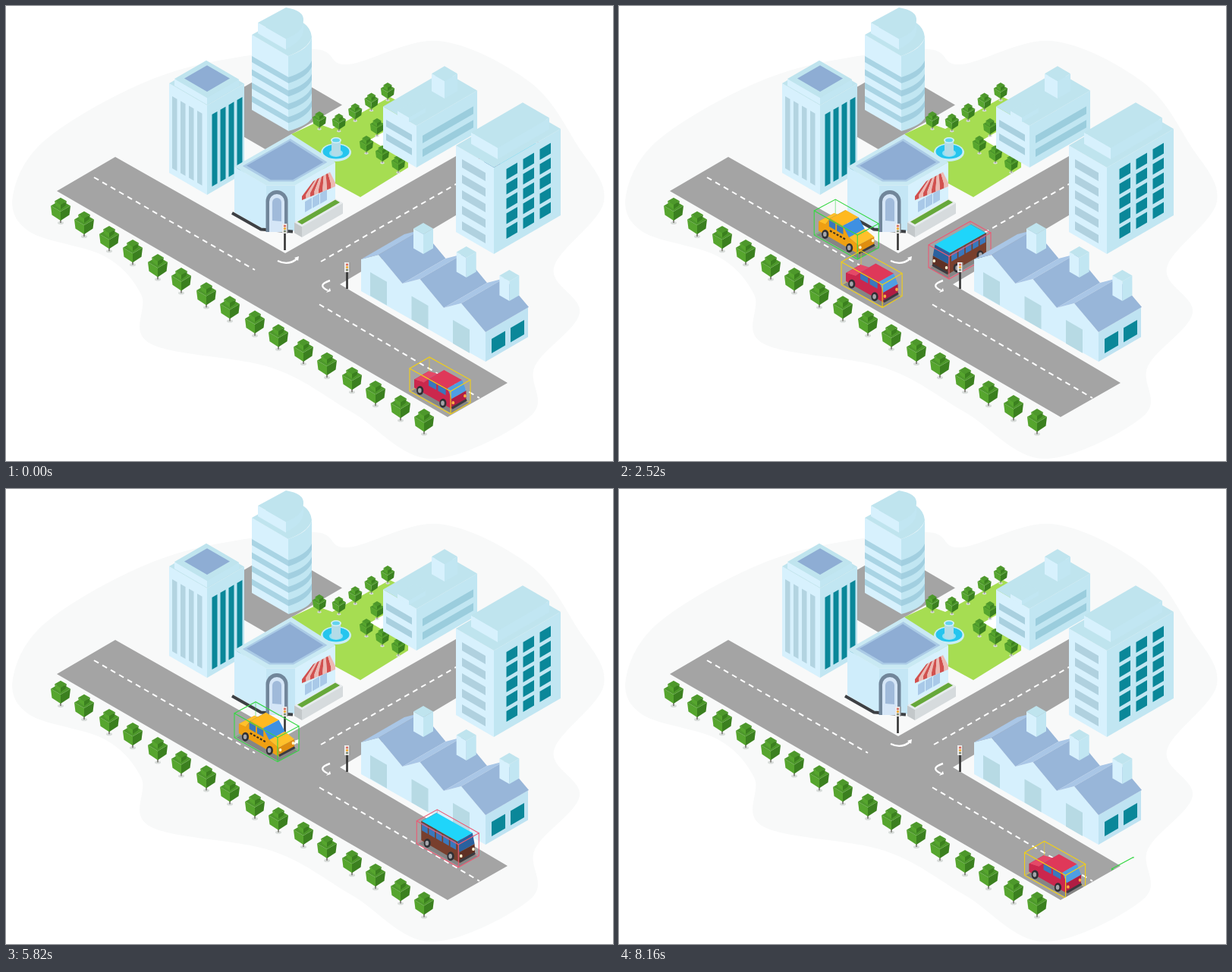
Recreate the animation shown at these times as an HTML page with a canvas. Size 800x600 px, loop 8.22 s.

```html
<!DOCTYPE html>
<html>
<head>
<meta charset="utf-8">
<title>Isometric traffic</title>
<style>
html, body { margin: 0; width: 100%; height: 100%; overflow: hidden; background: #fff; }
canvas { display: block; }
</style>
</head>
<body>
<canvas id="stage" width="800" height="600"></canvas>
<script>
const ctx = document.getElementById('stage').getContext('2d');
const LOOP = 8220, STEP = 60, SLOPE = .58;
const PALE = '#d7f1fd', SIDE = '#c1e6f2', ROOF = '#bfe4ee', BAND = '#a9d0df',
      TEAL = '#0a8799', BLUE = '#8eadd4', GRAY = '#a4a4a4';

function trace(points) {
  ctx.beginPath();
  points.forEach(p => ctx.lineTo(...p));
}
function poly(color, ...points) {
  trace(points);
  ctx.fillStyle = color;
  ctx.fill();
}
function line(color, width, ...points) {
  trace(points);
  ctx.strokeStyle = color;
  ctx.lineWidth = width;
  ctx.stroke();
}
function shape(color, d) {
  ctx.fillStyle = color;
  ctx.fill(new Path2D(d));
}
function oval(color, x, y, rx, ry) {
  ctx.beginPath();
  ctx.ellipse(x, y, rx, ry, 0, 0, 7);
  ctx.fillStyle = color;
  ctx.fill();
}
function at(x, y, draw, sx = 1, sy = sx) {
  ctx.save();
  ctx.translate(x, y);
  ctx.scale(sx, sy);
  draw();
  ctx.restore();
}
function repeat(n, draw) {
  for (let i = 0; i < n; i++) draw(i);
}

// Wall piece whose top edge follows the given slope
function panel(color, x, y, w, h, slope = SLOPE) {
  const y2 = y + w * slope;
  poly(color, [x, y], [x + w, y2], [x + w, y2 + h], [x, y + h]);
}
// Flat rhombus from its front corner, a to the left and b to the right
function tile(color, x, y, a, b) {
  const k = SLOPE;
  poly(color, [x, y], [x - a, y - a * k], [x - a + b, y - (a + b) * k], [x + b, y - b * k]);
}
function prism(x, y, a, b, h, top = ROOF, left = PALE, right = SIDE) {
  panel(left, x - a, y - a * SLOPE, a, h);
  panel(right, x, y, b, h, -SLOPE);
  tile(top, x, y, a, b);
}

function blob() {
  const p = [[10,245], [60,170], [216,88], [400,57], [450,77], [570,46], [690,100], [752,182], [788,258],
    [722,345], [756,405], [697,475], [692,540], [560,597], [455,535], [350,477], [190,445], [178,380],
    [130,330], [30,297]];
  const n = p.length, get = i => p[(i + n) % n];
  const handle = (i, s) => [0, 1].map(k => get(i)[k] + s * (get(i + 1)[k] - get(i - 1)[k]) / 6);
  ctx.beginPath();
  ctx.moveTo(...p[0]);
  repeat(n, i => ctx.bezierCurveTo(...handle(i, 1), ...handle(i + 1, -1), ...get(i + 1)));
  ctx.fillStyle = '#f8f9f9';
  ctx.fill();
}

function arrow(d, x, y, tilt) {
  ctx.strokeStyle = '#fff';
  ctx.lineWidth = 2.4;
  ctx.stroke(new Path2D(d));
  poly('#fff', [x, y], [x - 6, y + 2], [x - 1, y + tilt]);
}
function roads() {
  tile(GRAY, 342, 189, 85, 101);
  poly(GRAY, [144,199], [368,326], [593,198], [655,239], [440,367], [661,497], [582,542], [67,244]);
  ctx.setLineDash([7, 5.7]);
  line('#fff', 2, [116,226], [328,348]);
  line('#fff', 2, [413,393.5], [624,517]);
  line('#fff', 2, [415,337], [600,231]);
  ctx.setLineDash([]);
  arrow('M358 336Q372 343 384 333', 386, 330, 6);
  arrow('M427 362Q409 368 424 375', 428, 376, -4);
}

function tree() {
  oval('#d8dcda', 0, 19, 4, 2);
  line('#8c8c86', 2, [0, 11], [0, 19]);
  [[13, 4, 12], [8, -5, 6]].forEach(([r, y, h]) => {
    poly('#56a52e', [-r, y - r * SLOPE], [0, y], [0, y + h], [1.5 - r, y + h - r * SLOPE]);
    poly('#3b801f', [r, y - r * SLOPE], [0, y], [0, y + h], [r - 1.5, y + h - r * SLOPE]);
    tile('#4d982b', 0, y, r, r);
  });
}
function treeRow(x, y, dx, dy, n, size = 1) {
  repeat(n, i => at(x + dx * i, y + dy * i, tree, size));
}

function park() {
  poly('#a6dd52', [376,169], [408,154], [430,162], [506,120], [530,132], [530,213], [467,252], [434,234]);
  tile('#fff', 526, 203, 46, 50);
  oval('#c9edf5', 435, 193, 20, 12);
  oval('#25c5ee', 435, 192, 17.5, 9.5);
  oval('#8fe2f5', 435, 194, 9, 5);
  panel('#b2dce8', 429, 178, 12, 17, 0);
  oval('#b2dce8', 435, 195, 6, 3);
  oval('#d3f0f7', 435, 177, 7, 4);
  oval('#62d3ee', 435, 177, 5, 2.5);
  treeRow(503, 111, -21.4, 13.6, 4, .7);
  treeRow(413, 149, 76, 9, 2, .7);
  treeRow(475, 181, 21, 12.7, 3, .7);
}

function roundTower() {
  shape(SIDE, 'M372 66Q401 56 403 40V148Q397 158 372 165Z');
  panel(PALE, 324, 38, 48, 99);
  repeat(4, i => {
    const y = 66 + 17.5 * i;
    panel('#a9d4e4', 324, y, 48, 8);
    shape('#a2cfe0', `M372 ${y + 28}Q397 ${y + 20} 403 ${y + 6}v8Q397 ${y + 28} 372 ${y + 36}Z`);
  });
  shape(ROOF, 'M324 38L361 17Q400 15 403 41Q399 56 372 66Z');
  shape(SIDE, 'M369 43Q393 34 392 18V31Q392 45 369 57Z');
  panel(PALE, 332, 22, 37, 14);
  shape(ROOF, 'M332 22L369 2Q393 6 392 19Q392 34 369 43Z');
}

function stripedTower() {
  prism(265, 131, 50, 49, 118);
  repeat(4, i => {
    panel('#b3d4e1', 219 + i * 11, 119 + i * 6.3, 6.5, 95);
    panel(TEAL, 271.5 + i * 11, 143 - i * 6.3, 7, 95, -SLOPE);
  });
  prism(265, 121, 43, 42, 9);
  tile(BLUE, 265, 113, 30, 30);
}

function awning() {
  const n = 8, top = k => [405 + 22 * k, 231 - 12 * k], edge = (k, y) => [390 + 44 * k, y - 18 * k];
  repeat(n, i => {
    const a = i / n, b = (i + 1) / n;
    poly(i % 2 ? '#edb9b3' : '#d2504e', top(a), top(b), edge(b, 251), edge(b, 256), edge(a, 256), edge(a, 251));
  });
}
function shop() {
  panel('#cfedfb', 301, 212, 42, 60);
  panel('#c4e6f5', 343, 236.5, 38, 60, 0);
  panel(PALE, 381, 236.5, 53, 60, -SLOPE);
  const rim = [[301,212], [376,169], [434,206], [381,236.5], [343,236.5]];
  const inset = s => rim.map(([x, y]) => [368 + (x - 368) * s, 206 + (y - 206) * s]);
  poly('#c9e9f3', ...rim);
  poly('#abcbe6', ...inset(.84));
  poly(BLUE, ...inset(.76));
  line('#3d4044', 4, [298,273], [336,294.5], [378,297.5]);
  const arch = (color, r, y) => shape(color, `M${357 - r} 298V${y + r}a${r} ${r} 0 0 1 ${2 * r} 0V298Z`);
  arch('#71869a', 14.5, 243);
  arch('#d5e6f7', 10, 248);
  shape('#a0bada', 'M351 283V259a6 6 0 0 1 12 0V284Z');
  repeat(3, i => panel('#a9c9e8', 394 + 10 * i, 258 - 5.5 * i, 9, 14, -SLOPE));
  awning();
  prism(390, 291, 10, 54, 14, '#e7ebec', '#c3c8ca', '#d6dbdd');
  tile('#66a83a', 390, 288, 6, 50);
}

function office() {
  prism(541, 158, 44, 80, 55);
  [16, 34].forEach(d => {
    panel(BAND, 501, 134 + d, 34, 9);
    panel('#9bcddd', 549, 155 + d, 67, 10, -SLOPE);
  });
  prism(531, 147, 15, 22, 6);
  prism(578, 99, 17, 17, 23);
}

function block() {
  prism(643, 213, 50, 88, 114);
  repeat(5, r => {
    panel('#b0d1df', 601, 202 + r * 20.5, 31, 11);
    repeat(3, c => panel(TEAL, 659.5 + c * 22, 215 + r * 19.5 - c * 13, 14.5, 14, -SLOPE));
  });
  prism(648, 187, 35, 68, 15);
}

function factory() {
  const wall = [], dx = 54.5, dy = 32;
  repeat(3, i => wall.push([468 + dx * i, 334 + dy * i], [491 + dx * i, 328 + dy * i]));
  wall.push([632, 430]);
  poly('#d6f0fd', ...wall, [632, 469], [468, 376]);
  panel('#bfe3f2', 632, 430, 56, 39, -SLOPE);
  repeat(2, i => panel(TEAL, 640 + 25 * i, 439 - 14.5 * i, 18, 19, -SLOPE));
  repeat(6, i => {
    const [a, b] = [wall[i], wall[i + 1]], back = p => [p[0] + 57, p[1] - 33];
    poly(i % 2 ? '#98b6d9' : '#a9c6e6', a, b, back(b), back(a));
  });
  repeat(3, i => {
    panel('#b7dae4', 480 + dx * i, 351 + 31.5 * i, 22, 31);
    prism(550 + 56.7 * i, 301 + 31 * i, 13, 13, 26);
  });
}

function signal(x, y) {
  line('#333', 2.6, [x, y], [x, y + 35]);
  panel('#eceaea', x - 3.5, y, 6.5, 13, 0);
  line('#8f8f8f', 1, [x + 3.5, y], [x + 3.5, y + 13]);
  ['#d9695b', '#f0a92c', '#7c8a70'].forEach((c, i) => oval(c, x, y + 3 + 3.5 * i, 1.6, 1.6));
}

// Each vehicle is a side profile (length, height) extruded across its box.
// faces: colour of each profile edge; glass: start, end, bottom, top and pane count.
const RED = {
  wire: '#f1cf16', size: [26, 15, 54, 30, 30], side: '#cb274d',
  profile: [[.05,.14], [.05,.5], [.28,.6], [.42,.92], [.86,.92], [.96,.55], [.96,.12]],
  faces: ['#b01d43', '#e54867', '#4f9fe3', '#df3859', '#4f9fe3', '#b01d43'],
  glass: [.4, .86, .58, .84, 2], lamp: '#ffae42'
};
const TAXI = {
  wire: '#35d843', size: [28, 15, 57, 32, 32], side: '#f0a012',
  profile: [[.04,.15], [.04,.54], [.2,.58], [.3,.92], [.6,.92], [.74,.58], [.96,.48], [.96,.12]],
  faces: ['#df8e10', '#ffc02b', '#3467a8', '#ffb91f', '#3f90e2', '#ffc02b', '#df8e10'],
  glass: [.28, .64, .57, .84, 2], lamp: '#fff4c4', stripe: '#38301f'
};
const BUS = {
  wire: '#ec5a74', size: [27, 15, 55, 31, 30], side: '#783f2d',
  profile: [[.05,.14], [.05,.98], [.91,.98], [.96,.55], [.97,.1]],
  faces: ['#5b2d22', '#1fd5fa', '#2a619f', '#5f3125'],
  glass: [.06, .91, .58, .92, 5], lamp: '#fff3d0'
};

function vehicle({ wire, size: [w, d, l, m, h], side, profile, faces, glass, lamp, stripe }) {
  const at3 = (a, b, c) => [a * l + b * w, d + a * m - b * d + (1 - c) * h];
  const near = .13, far = .87;
  const edge = (...corners) => line(wire, 1.1, ...corners.map(c => at3(...c)));
  ctx.globalAlpha = .5;
  edge([0,0,0], [0,1,0], [1,1,0]);
  edge([0,1,0], [0,1,1]);
  ctx.globalAlpha = 1;

  poly('#858585', at3(.02, .05, 0), at3(.02, .95, 0), at3(1, .95, 0), at3(1, .05, 0));
  faces.forEach((color, i) => {
    const [p, q] = [profile[i], profile[i + 1]];
    poly(color, at3(p[0], near, p[1]), at3(p[0], far, p[1]), at3(q[0], far, q[1]), at3(q[0], near, q[1]));
  });
  poly(side, ...profile.map(([a, c]) => at3(a, near, c)));
  const [start, end, low, high, n] = glass, pane = (end - start) / n;
  repeat(n, i => {
    const a = start + pane * i, b = a + pane * .82;
    poly('#3978bd', at3(a, near, low), at3(a, near, high), at3(b, near, high), at3(b, near, low));
  });
  if (stripe) {
    ctx.setLineDash([3, 2]);
    line(stripe, 2.2, at3(.3, near, .42), at3(.68, near, .42));
    ctx.setLineDash([]);
  }
  line('#3b3b40', 3, at3(.97, near, .16), at3(.97, far, .16));
  [.2, .8].forEach(b => oval(lamp, ...at3(.965, b, .36), 1.8, 2.2));
  [.2, .76].forEach(a => {
    const [x, y] = at3(a, near - .02, .18);
    oval('#2f3035', x, y, 4.6, 6);
    oval('#a5a5aa', x - .4, y, 2.3, 3.3);
  });

  edge([0,0,1], [0,1,1], [1,1,1], [1,0,1], [0,0,1], [0,0,0], [1,0,0], [1,1,0], [1,1,1]);
  edge([1,0,1], [1,0,0]);
}

const TURN = 4250;
function mainRoad(t) {
  const taxiX = t < 5640 ? Math.min(274, 179 + .0815 * (t - 1560)) : 301 + .149 * (t - 5820);
  const redX = 532 - .0948 * (t > 6500 ? t - 8187 : t);
  const busX = 396 + .1153 * (t - 4560);
  ctx.save();
  // Both ends of the road cut vehicles off
  trace([[-200,399], [400,51], [1000,301], [400,647]]);
  ctx.clip();
  at(taxiX, 209 + .588 * (taxiX - 179), () => vehicle(TAXI));
  at(redX, 463 + .588 * (redX - 532), () => vehicle(RED));
  if (t >= TURN) at(busX, 332 + .625 * (busX - 396), () => vehicle(BUS));
  ctx.restore();
}
function sideRoad(t) {
  if (t >= TURN) return;
  const x = t < 3670 ? Math.max(408, 490 - .0855 * (t - 1560)) : 408 - .0845 * (t - 3670);
  at(x + 82, 284 + .545 * (408 - x), () => vehicle(BUS), -1, 1);
}

function frame() {
  const t = Math.floor(performance.now() % LOOP / STEP) * STEP;
  ctx.fillStyle = '#fff';
  ctx.fillRect(0, 0, 800, 600);
  blob();
  roads();
  roundTower();
  park();
  stripedTower();
  shop();
  office();
  treeRow(72, 267, 64, 37.2, 8);
  treeRow(103, 285, 64, 37.2, 8);
  sideRoad(t);
  block();
  factory();
  signal(367.5, 287);
  signal(449.5, 338);
  mainRoad(t);
  requestAnimationFrame(frame);
}
frame();
</script>
</body>
</html>
```
